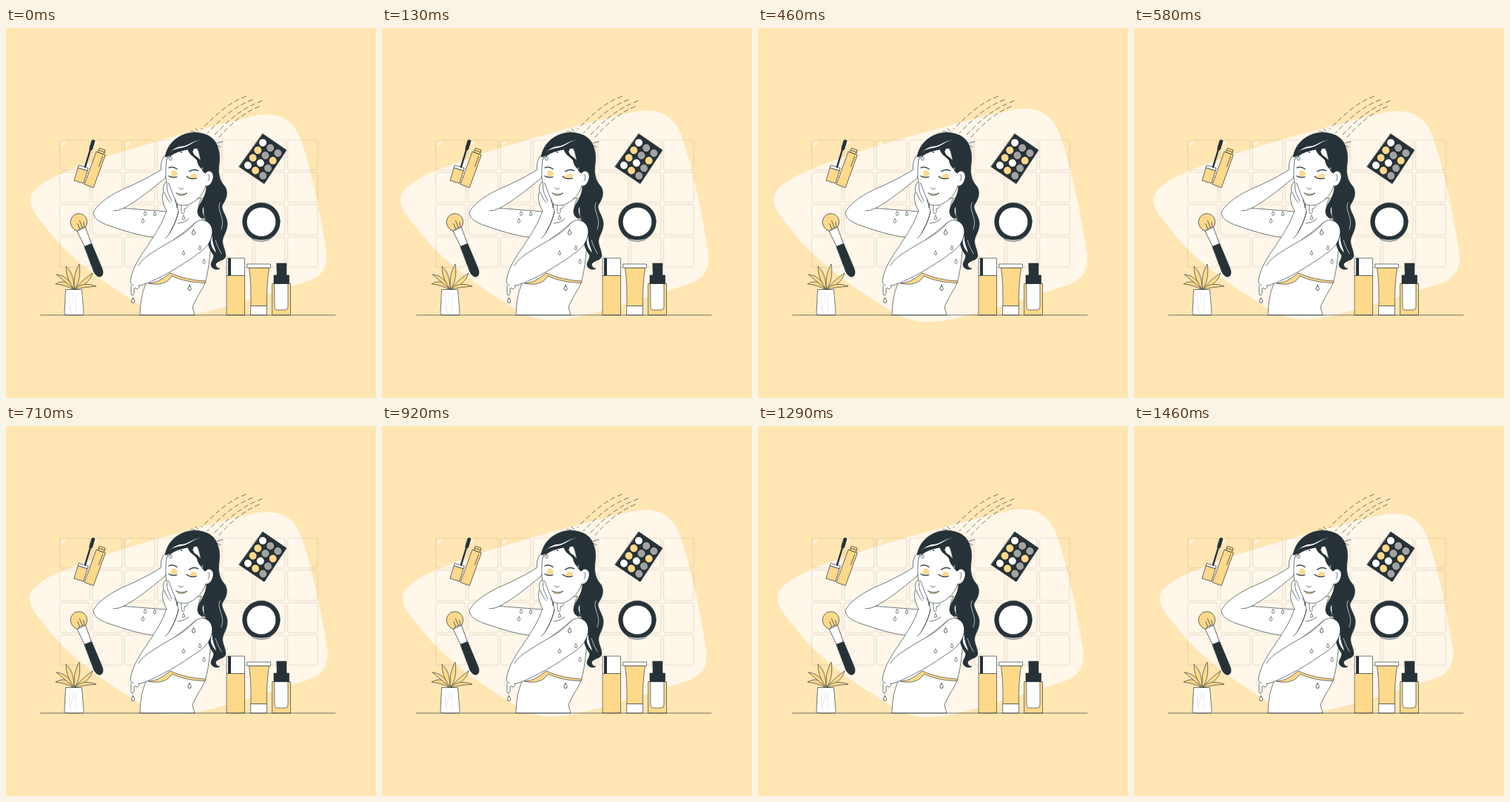
These frames come from a looping animation (500x500 px, 1500 ms). An HTML page:

```html
<!DOCTYPE html>
<html lang="en">
<head>
<meta charset="utf-8">
<title>Skin care</title>
<style>
html, body { margin: 0; width: 100%; height: 100%; overflow: hidden; background: #ffe6b3; }
svg { display: block; width: 100vw; height: 100vh; }
.art { stroke: #263238; stroke-width: .65; stroke-linecap: round; stroke-linejoin: round; fill: none; }
.w { fill: #fff; }
.y { fill: #ffd98a; }
.k { fill: #263238; }
.g { fill: #a3a3a3; }
.n { stroke: none; }
#blob {
  fill: #fff7e9;
  transform-origin: 233.4px 253px;
  animation: pulse 1.5s linear infinite;
}
@keyframes pulse {
  0% { transform: scale(1.01); }
  16.67% { transform: scale(1.088); }
  20.5% { transform: scale(1.1); }
  30.67% { transform: scale(1.07); }
  47.33% { transform: scale(1.016); }
  52.3% { transform: scale(1); }
  72% { transform: scale(1.079); }
  77% { transform: scale(1.1); }
  86% { transform: scale(1.043); }
  97.33% { transform: scale(1); }
  100% { transform: scale(1.01); }
}
</style>
</head>
<body>
<svg viewBox="0 0 500 500">
<defs>
  <pattern id="tile" x="71.5" y="150.5" width="44" height="43.7" patternUnits="userSpaceOnUse">
    <rect x=".8" y=".8" width="40.7" height="40.7" rx="3.5" fill="none" stroke="#5a4a35" stroke-opacity=".15" stroke-width="1.1"/>
    <path d="M3.5 10V6Q3.5 3.5 6 3.5H10Z" fill="#fff" fill-opacity=".75"/>
  </pattern>
  <path id="drop" class="w" d="M0-2.6C1 -1 1.7 0 1.7 1A1.7 1.7 0 0 1-1.7 1C-1.7 0-1-1 0-2.6Z"/>
</defs>

<path id="blob" d="M35 232C36 212 76 196 130 177C190 157 290 130 335 120C371 113 386 128 395 147C411 190 424 255 431 303C433 325 423 336 404 342C350 359 290 379 248 386.500C207 392 190 379 160 359C125 337 80 304 55 268C42 252 35 245 35 232Z"/>
<rect x="71.500" y="150.500" width="352" height="174.800" fill="url(#tile)"/>

<g class="art">
  <!-- shower -->
  <g stroke-dasharray="6 4.500">
    <path d="M324 92.500C302 100 284 117 264 137"/>
    <path d="M333 97C309 106 292 121 272 142"/>
    <path d="M346 98.500C320 108 302 123 282 144"/>
    <path d="M342 106C319 116 303 130 285 151"/>
  </g>
  <path d="M250 139.500L256 140.500M256 136L260 140M285 155.500L293 153.500M284 158L290 161"/>

  <!-- mascara -->
  <g transform="translate(101.500 198.500)rotate(17)">
    <path class="y" d="M-6.500-8H6.500V10H-6.500Z"/>
    <path class="w" d="M-6.500-11.500H6.500V-8H-6.500Z"/>
    <path stroke-width="2.400" d="M2-12V-38"/>
    <path stroke-width="4.800" d="M2.300-38V-48"/>
  </g>
  <g transform="translate(120.500 191)rotate(20)">
    <path class="y" d="M-6.300-23H6.300V24H-6.300Z"/>
    <path class="y" d="M-4-29H4V-23H-4ZM-4-26H4"/>
    <path d="M3.500-20V-5"/>
  </g>

  <!-- brush -->
  <g transform="translate(98 262)rotate(-22)">
    <path class="w" d="M-6 11L6 10L5 34H-4.500Z"/>
    <path class="y" d="M-6 11C-12 6-13-3-7-8C-3-12 5-12 9-7C14-1 11 7 6 10C2 8-2 9-6 11Z"/>
    <path d="M-2 9V2M2 8V-1M5 8L6 3"/>
    <path class="k" d="M-5 34H5.500L6 70C6 83-5.500 83-6 70Z"/>
  </g>

  <!-- palette -->
  <path class="k" d="M347 143L379 165L349 210.500L315 187.500Z"/>
  <g class="n" transform="matrix(10.200 7 -6.700 10.200 347 155)">
    <g class="w"><circle r=".41"/><circle cx="1" cy="2" r=".41"/><circle cy="3" r=".41"/></g>
    <g class="y"><circle cy="1" r=".41"/><circle cx="2" cy="1" r=".41"/><circle cy="2" r=".41"/><circle cx="1" cy="3" r=".41"/></g>
    <g class="g"><circle cx="1" r=".41"/><circle cx="2" r=".41"/><circle cx="1" cy="1" r=".41"/><circle cx="2" cy="2" r=".41"/><circle cx="2" cy="3" r=".41"/></g>
  </g>

  <!-- compact -->
  <circle class="w" cx="345" cy="263.500" r="24.500"/>
  <circle class="k" cx="345" cy="261.500" r="25.300"/>
  <circle class="w" cx="345" cy="262" r="19.800"/>
  <path class="w" d="M333 284.500Q345 288 357 284.500L355 286.500Q345 290 335 286.500Z"/>

  <!-- plant -->
  <g class="y">
    <path d="M90 353C86 343 78 340 67 346C76 347 83 349 90 353Z"/>
    <path d="M92 353C87 340 78 334 68 333C77 340 83 346 92 353Z"/>
    <path d="M92 353C92 338 88 328 81 322C81 335 86 345 92 353Z"/>
    <path d="M93 353C102 342 110 336 117 331C114 342 105 349 93 353Z"/>
    <path d="M93 353C100 345 111 345 122 349C111 350 102 351 93 353Z"/>
    <path d="M93 353C90 340 94 328 99 319C101 333 99 344 93 353Z"/>
  </g>
  <path class="w" d="M81 353.500H102.500L105 385Q105 388 103 388H81Q79 388 79 385Z"/>
  <path stroke-opacity=".18" d="M86 360Q84 374 88 384M97 359Q91 370 96 383M91 357Q92 370 86 379"/>

  <!-- cosmetics -->
  <path class="y" d="M298.500 334.500H322.500V388H298.500Z"/>
  <path class="w" d="M298.500 311H322.500V334.500H298.500Z"/>
  <path class="k n" d="M300 311H304V334.500H300Z"/>
  <path class="y" d="M328.500 324H355.500C353 340 352 360 352.500 375.500H331C331 360 331 340 328.500 324Z"/>
  <path class="w" d="M326 319H357.500V324H326ZM331 375.500H352.500V388H331Z"/>
  <path class="y" d="M360 345.500H384.500V388H360Z"/>
  <path class="w" d="M363 345.500H381V377Q381 381 377 381H367Q363 381 363 377Z"/>
  <path class="k" d="M366 318H379V334H382.500V345.500H362V334H366Z"/>

  <!-- raised arm -->
  <path class="w" d="M216 171C211 176 208 184 210 191C198 199 181 208 160 217C142 225 124 237 118 249C119 258 125 262 139 267C160 274 180 281 202 283L224 264L217 248L159 243.500C177 234 195 219 215 203L222 186Z"/>
  <path d="M159 243.500Q152 247 145 247"/>

  <!-- torso -->
  <path class="w" d="M232 238L231 248L210 275L192 340C186 351 182 362 181 388H255L252 377C258 362 267 352 270 341C274 325 276 307 277 289C281 276 279 263 265 258C258 252 258 242 264 230Z"/>
  <path d="M232 264Q241 263 247 258"/>
  <path class="y" d="M193 345C206 344 214 337 222 331C237 338 253 341 270 342L269.500 344.500C251 344 237 341 224 335C219 346 204 348 193 345Z"/>

  <!-- hair -->
  <path class="k" d="M215 174C218 158 228 148 243 143C253 140 267 141 276 147C287 154 290 170 288 184C286 196 289 206 294 212C301 219 299 230 293 238C289 244 297 251 299 262C300 272 295 278 293 285C291 292 297 300 297 308C296 314 289 313 284 318C282 322 286 325 289 325C284 328 277 325 277 319C278 314 282 311 280 306C276 300 271 293 275 284C281 274 277 266 270 260C267 255 268 247 267 241C263 247 267 252 268 257C262 258 258 252 259 246C262 235 271 228 271 213L260 165Z"/>
  <path class="w n" d="M279 281C274 290 278 297 284 304C282 295 278 290 279 281Z"/>
  <path stroke="#fff" d="M289 236C284 247 297 256 291 272M283 287Q286 297 291 305"/>

  <!-- face -->
  <path class="w" d="M217 178C224 169 236 166 247 163C248 168 253 171 257 175C264 179 266 186 267 195L270 196C274 190 281 195 280 202C279 209 274 215 270 213C267 223 260 232 250 237C241 242 231 240 224 232C217 221 214 202 217 178Z"/>
  <path class="k n" d="M216 174C227 167 236 167 247 164L252 154L232 156ZM245 160C245 171 254 173 258 179C259 185 263 190 265 191L266 182Z"/>
  <path class="w n" d="M254 163C251 169 255 174 261 175C260 170 257 167 259 163Z"/>
  <path class="w n" d="M263 151C251 153 245 160 236 160C230 161 224 165 219 170C225 164 231 163 237 162C247 161 251 154 263 151Z"/>
  <path stroke-width="1.300" d="M220 189Q225 186 231 190.500M247.500 194Q254 189.500 260 193"/>
  <path class="y n" d="M224 193Q230 191 232 198Q229 202 223 200ZM249 199Q254 194 258 199L257 203Q252 204 249 202Z"/>
  <path stroke-width="1.200" d="M220 200Q225 203 231 201M246 202Q251 205 257.500 203M246 202L244.500 200.500"/>
  <path d="M233 215.500Q236 219.500 239.500 216.500M273 198Q277 199 273 207"/>
  <path class="y" d="M230 223Q237 226.500 245 223Q240 227.500 234 226Z"/>
  <circle class="k n" cx="266" cy="192" r="1.200"/>

  <!-- near arm and hand -->
  <path class="w" d="M217 209C213 209 212 215 213 221C210 229 212 238 217 247C211 264 202 279 190 296C181 310 171 323 168 342C169 349 176 350 185 347C207 339 235 323 261 304C274 295 281 282 278 270C275 260 264 257 256 263C246 271 238 279 221 289L218 283C224 271 230 262 233 248C231 238 229 230 226 226L220 210Z"/>
  <path class="w n" d="M213 288L227 269L246 270L219 292Z"/>
  <path d="M233 248C230 264 221 279 216 284M256 263C244 278 226 286 213 294C197 304 184 311 179 321M218 211C216 220 221 226 224 234M214 222Q217 231 222 236M228 232Q231 238 231 243"/>

  <!-- water -->
  <path class="w" d="M237 240V249Q239 253 241 249V244Q244 245 246 240"/>
  <path class="w" d="M169 348V359Q171 364 173 359V352Q175 350 177 353Q180 352 180 347.500"/>
  <use href="#drop" x="188" y="250.500"/><use href="#drop" x="201" y="251"/>
  <use href="#drop" x="185" y="260.500"/><use href="#drop" x="240" y="256"/>
  <use href="#drop" x="240" y="304"/><use href="#drop" x="262" y="297"/>
  <use href="#drop" x="267.500" y="315.500"/><use href="#drop" x="222.500" y="176"/>
  <use href="#drop" transform="translate(253.500 276)scale(1.250)"/>
  <use href="#drop" transform="translate(248 351)scale(1.250)"/>
  <use href="#drop" transform="translate(171.500 368)scale(1.250)"/>
  <circle class="k n" cx="237" cy="168" r=".9"/>

  <path d="M46.500 388H445"/>
</g>
</svg>
</body>
</html>
```
